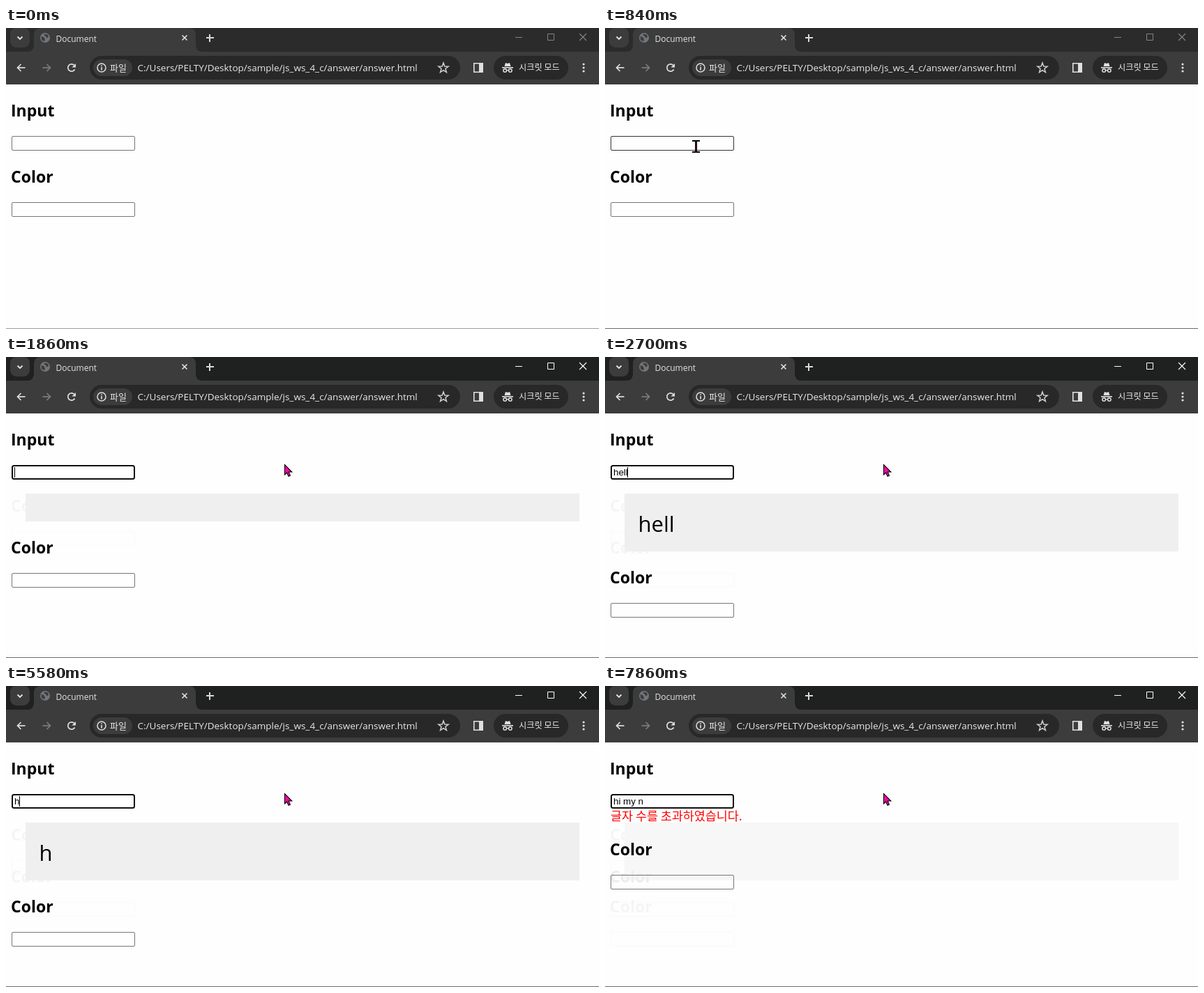
An HTML page with a canvas that plays this animation: 850x432 px, repeating every 8 s.

```html
<!DOCTYPE html>
<html lang="ko">
<head>
<meta charset="utf-8">
<title>Document</title>
<style>
html, body { margin: 0; width: 100%; height: 100%; overflow: hidden; background: #fff; }
canvas { display: block; }
</style>
</head>
<body>
<canvas id="stage" width="850" height="432"></canvas>
<script>
const ctx = document.getElementById('stage').getContext('2d');
const LOOP = 8000, STEP = 60;
const UI = '"Open Sans", "Noto Sans", sans-serif';
const KR = '"Noto Sans CJK KR", "Noto Sans CJK", sans-serif';
const FIELD = '13.333px "Liberation Sans", Arial, sans-serif';

// [start, value] lists: the last entry reached is the current one
const TYPED = [[0, ''], [2220, 'h'], [2400, 'he'], [2520, 'hel'], [2700, 'hell'], [2880, 'hello'],
  [4560, ''], [5580, 'h'], [5700, 'hi'], [6600, 'hi '], [6840, 'hi m'], [7020, 'hi my'],
  [7200, 'hi my '], [7320, 'hi my n']];
const COLOR_Y = [[0, 222], [900, 282], [2220, 325], [4560, 282], [5580, 325], [7200, 243]];
const CARET = [[0, false], [900, true], [1380, false], [1860, true], [3360, false], [3900, true],
  [4140, false], [4560, true], [5100, false], [5580, true], [6240, false], [6600, true], [7860, false]];
const at = (list, t) => list.filter(e => e[0] <= t).pop()[1];

// pointer moves: first step, last step, start, control point, end, easing power
const MOVES = [
  { from: 180, to: 660, a: [780, 129], c: [400, 240], b: [130, 170], ease: 2 },
  { from: 1020, to: 1380, a: [130, 170], c: [270, 191], b: [381, 180], ease: 1.4 },
  { from: 1500, to: 1680, a: [381, 180], c: [395, 166], b: [399, 154], ease: 1 }
];

function pointerAt(t) {
  const m = MOVES.filter(v => v.from <= t).pop();
  if (!m) return null;
  const k = Math.floor(t / STEP) * STEP;
  const u = Math.min(1, (k - m.from) / (m.to - m.from));
  const s = 1 - Math.pow(1 - u, m.ease), r = 1 - s;
  const mix = i => Math.round(r * r * m.a[i] + 2 * r * s * m.c[i] + s * s * m.b[i]);
  return [mix(0), mix(1)];
}

function rect(x, y, w, h, color) {
  ctx.fillStyle = color;
  ctx.fillRect(x, y, w, h);
}

function round(x, y, w, h, r, color) {
  ctx.fillStyle = color;
  ctx.beginPath();
  ctx.roundRect(x, y, w, h, r);
  ctx.fill();
}

function line(points, color, width = 1, close = false) {
  ctx.strokeStyle = color;
  ctx.lineWidth = width;
  ctx.beginPath();
  points.forEach(([x, y]) => ctx.lineTo(x, y));
  if (close) ctx.closePath();
  ctx.stroke();
}

function poly(points, color) {
  ctx.fillStyle = color;
  ctx.beginPath();
  points.forEach(([x, y]) => ctx.lineTo(x, y));
  ctx.fill();
}

function disc(x, y, r, color) {
  ctx.fillStyle = color;
  ctx.beginPath();
  ctx.arc(x, y, r, 0, 7);
  ctx.fill();
}

function ring(x, y, r, color, width, a = 0, b = Math.PI * 2) {
  ctx.strokeStyle = color;
  ctx.lineWidth = width;
  ctx.beginPath();
  ctx.arc(x, y, r, a, b);
  ctx.stroke();
}

function text(str, x, y, font, color) {
  ctx.font = font;
  ctx.fillStyle = color;
  ctx.fillText(str, x, y);
}

function tabStrip(active) {
  const glyph = active ? '#fff' : '#858585';
  rect(0, 0, 850, 34, active ? '#1f2120' : '#2b2b2b');
  round(6, 0, 28, 28, [8, 8, 9, 9], '#3c3c3c');
  line([[16.5, 12.5], [20, 16], [23.5, 12.5]], '#e3e3e3', 1.8);

  ctx.fillStyle = '#3c3c3c';
  ctx.beginPath();
  ctx.moveTo(30, 34);
  ctx.quadraticCurveTo(40, 34, 40, 24);
  ctx.lineTo(40, 10);
  ctx.quadraticCurveTo(40, 0, 50, 0);
  ctx.lineTo(262, 0);
  ctx.quadraticCurveTo(272, 0, 272, 10);
  ctx.lineTo(272, 24);
  ctx.quadraticCurveTo(272, 34, 282, 34);
  ctx.fill();

  disc(56, 14, 7, '#72767b');
  poly([[50.5, 12], [54, 13], [56, 16], [55, 19.5], [51, 17]], '#3c3c3c');
  poly([[55, 8.5], [60, 9.5], [61, 13], [58, 14.5], [57, 11.5], [54.5, 11]], '#3c3c3c');
  text('Document', 71.5, 20, '12px ' + UI, '#e3e3e3');
  line([[252.5, 10.5], [259.5, 17.5]], '#e3e3e3', 1.6);
  line([[259.5, 10.5], [252.5, 17.5]], '#e3e3e3', 1.6);
  rect(287, 13, 11, 2, '#d8d8d8');
  rect(291, 9, 2, 11, '#d8d8d8');

  rect(730, 13, 10, 1, glyph);
  line([[776.5, 8.5], [785.5, 8.5], [785.5, 17.5], [776.5, 17.5]], glyph, 1, true);
  line([[822, 8], [832, 18]], glyph, 1.1);
  line([[832, 8], [822, 18]], glyph, 1.1);
}

function arrowIcon(x, dir, color) {
  line([[x - 5.5 * dir, 57], [x + 5.5 * dir, 57]], color, 1.7);
  line([[x + dir * 0.5, 52], [x + 5.5 * dir, 57], [x + dir * 0.5, 62]], color, 1.7);
}

function toolbar() {
  const ink = '#e0e0e0';
  rect(0, 34, 850, 47, '#3c3c3c');
  arrowIcon(22, -1, ink);
  arrowIcon(58, 1, '#7d7d7d');
  ring(94, 57, 5.2, ink, 1.7, 0.5, 5.5);
  poly([[100, 51], [100, 56.5], [94.5, 56.5]], ink);

  round(120, 40, 531, 34, 17, '#282828');
  round(125, 45, 56, 24, 12, '#3c3c3c');
  ring(137, 57, 6, ink, 1.5);
  rect(136.2, 56, 1.6, 4.5, ink);
  rect(136.2, 53.3, 1.6, 1.6, ink);
  text('파일', 149, 61.5, '13px ' + KR, '#e8e8e8');
  text('C:/Users/PELTY/Desktop/sample/js_ws_4_c/answer/answer.html', 188.5, 62, '13.5px ' + UI, '#e8e8e8');

  const star = [];
  for (let i = 0; i < 10; i++) {
    const r = i % 2 ? 3.1 : 7.5, a = i * Math.PI / 5 - Math.PI / 2;
    star.push([627 + r * Math.cos(a), 57.5 + r * Math.sin(a)]);
  }
  line(star, '#d0d0d0', 1.5, true);

  line([[670.8, 50.8], [683.2, 50.8], [683.2, 63.2], [670.8, 63.2]], ink, 1.6, true);
  rect(678, 50, 6, 14, ink);

  round(699, 40, 107, 34, 17, '#282828');
  poly([[714.5, 55], [716, 50], [719, 51], [722, 50], [723.5, 55]], ink);
  rect(711, 56, 16, 1.6, ink);
  ring(715.2, 61, 2.3, ink, 1.5);
  ring(722.8, 61, 2.3, ink, 1.5);
  rect(717, 60, 4, 1.3, ink);
  text('시크릿 모드', 735, 61, '12.2px ' + KR, '#ececec');
  [52, 57, 62].forEach(y => disc(828, y, 1.6, ink));
}

const heading = (str, y) => text(str, 7, y, 'bold 23px ' + UI, '#000');

function field(y, color = '#767676', width = 1) {
  ctx.strokeStyle = color;
  ctx.lineWidth = width;
  ctx.beginPath();
  ctx.roundRect(8 + width / 2, y + width / 2, 177 - width, 21 - width, width + 0.5);
  ctx.stroke();
}

function colorBlock(y, alpha = 1) {
  ctx.globalAlpha = alpha;
  heading('Color', y);
  field(y + 28);
  ctx.globalAlpha = 1;
}

function pointer(x, y, beam) {
  if (beam) {
    rect(x - 5, y - 9, 11, 2, '#000');
    rect(x - 5, y + 7, 11, 2, '#000');
    rect(x - 1, y - 9, 3, 18, '#000');
    rect(x, y - 6, 1, 12, '#7a1040');
    return;
  }
  const shape = [[0.5, 0.5], [0.5, 15], [3.6, 12], [6, 17.3], [8.4, 16.2], [6.2, 11], [10.8, 11]]
    .map(([dx, dy]) => [x + dx, y + dy]);
  poly(shape, '#f508a4');
  line(shape, '#000', 1.1, true);
}

function page(t) {
  const value = at(TYPED, t), y = at(COLOR_Y, t);
  const focused = t >= 900, over = value.length > 5;
  const p = pointerAt(t);
  const inField = p && p[0] > 8 && p[0] < 185 && p[1] > 155 && p[1] < 176;

  rect(0, 81, 850, 351, '#fefefe');
  rect(0, 431, 850, 1, t < 840 ? '#9b9b9b' : '#6a6a6a');

  // faint traces of places the block has left
  const left = new Set(COLOR_Y.filter(e => e[0] <= t).map(e => e[1]));
  left.delete(y);
  left.forEach(v => colorBlock(v, 0.035));

  if (t >= 4560) rect(28, 196, 794, 83, '#f7f7f7');
  if (over) {
    ctx.globalAlpha = 0.035;
    heading('Color', 282);
    ctx.globalAlpha = 1;
    text('글자 수를 초과하였습니다.', 8, 193, '17.4px ' + KR, '#f00');
  } else if (focused) {
    rect(28, 196, 794, value ? 83 : 40, '#efefef');
    text(value, 47.5, 251, '31px ' + UI, '#000');
  }

  heading('Input', 127);
  colorBlock(y);
  if (focused) field(155, '#101010', 2);
  else field(155, inField ? '#333' : '#767676');

  ctx.font = FIELD;
  const w = ctx.measureText(value).width;
  const selected = t >= 4140 && t < 4560;
  if (selected) rect(12, 158, Math.round(w), 15, '#3367d1');
  text(value, 12, 170, FIELD, selected ? '#fff' : '#000');
  if (at(CARET, t)) rect(Math.floor(12 + w), 158, 1, 15, '#000');

  if (p) pointer(p[0], p[1], inField);
}

function draw(t) {
  tabStrip(t >= 900);
  toolbar();
  page(t);
}

const start = performance.now();
function tick() {
  draw((performance.now() - start) % LOOP);
  requestAnimationFrame(tick);
}
tick();
</script>
</body>
</html>
```
